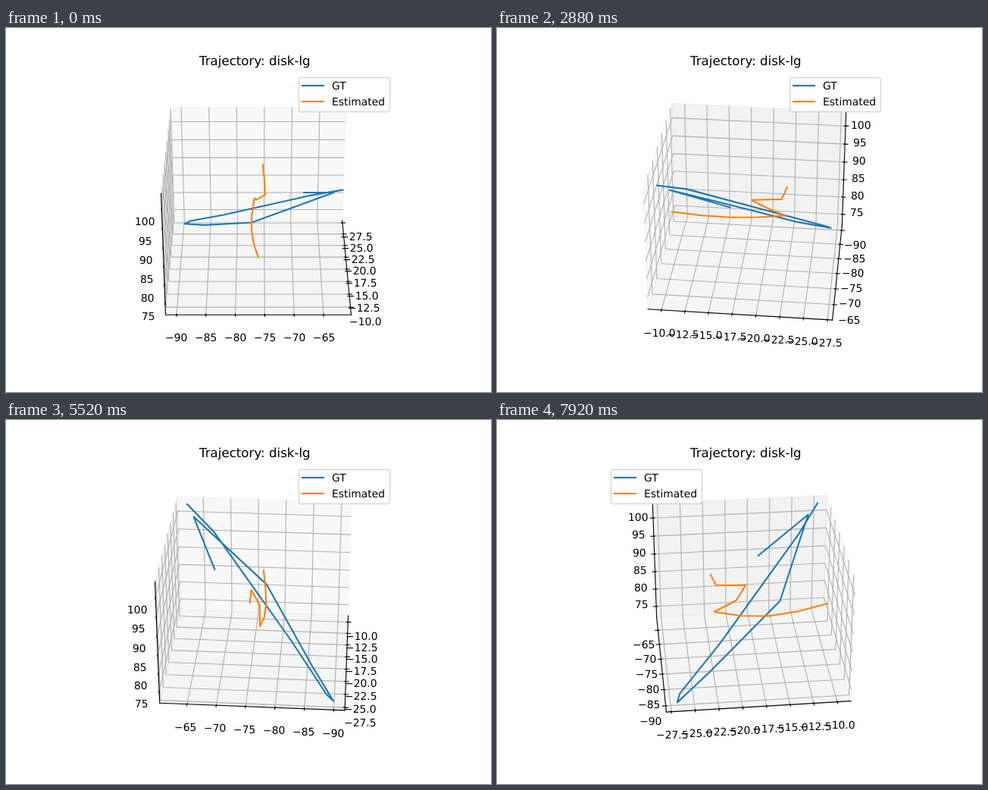
Recreate the animation shown at these times as an HTML page with a canvas. Size 640x480 px, loop 8 s.

```html
<!DOCTYPE html>
<html lang="en">
<head>
<meta charset="utf-8">
<title>Trajectory</title>
<style>
  html, body { margin: 0; width: 100%; height: 100%; overflow: hidden; background: #fff; }
  canvas { display: block; }
</style>
</head>
<body>
<canvas id="stage" width="640" height="480"></canvas>
<script>
const ctx = document.getElementById('stage').getContext('2d');

const LOOP = 8000, STEP = 120, DEGREES_PER_STEP = 4;
const PT = 100 / 72;              // pixels per point
const FONT = '"DejaVu Sans", Verdana, sans-serif';
const BLUE = '#1f77b4', ORANGE = '#ff7f0e';

// Camera: fixed elevation and distance, the azimuth turns.
const DISTANCE = 10, SCALE = 369.6 / 0.185, CENTER_X = 333, CENTER_Y = 237.4;
const SIN_E = 0.5, COS_E = Math.sqrt(3) / 2;

// Half sizes of the box, centred on the origin.
const HALF = [4, 4, 3].map(side => side * 0.1488);
const DELTA = HALF.map(h => h * 0.16);
const LABEL_SHIFT = 1.037;

const makeAxis = (dim, lo, hi, step, tone) => {
  const ticks = [];
  for (let value = Math.ceil(lo / step) * step; value < hi; value += step) {
    ticks.push({
      at: (2 * (value - lo) / (hi - lo) - 1) * HALF[dim],
      text: value.toFixed(step % 1 ? 1 : 0).replace('-', '\u2212')
    });
  }
  // "side" is the dimension in which the axis line moves to the front and its ticks point.
  return { ticks, side: dim === 0 ? 1 : 0, pane: `rgba(${tone},${tone},${tone},0.5)` };
};
const AXES = [
  makeAxis(0, -28.02, -8.56, 2.5, 242),
  makeAxis(1, -91.87, -60.3, 5, 230),
  makeAxis(2, 71.78, 103.92, 5, 236)
];

// The true path climbs with x, apart from a lift at some corners.
const corner = (x, y, lift = 0) => [x, y, 0.825 * x + lift];
const TRUTH = [
  corner(0.092, 0.296, 0.093), corner(0.45, 0.47), corner(0.199, -0.043, -0.158),
  corner(-0.296, -0.37, -0.062), corner(-0.52, -0.52), corner(-0.5, -0.474, 0.02),
  corner(-0.213, -0.231), corner(0.367, 0.324), corner(0.52, 0.52)
];

// The estimate sags along a shallow arc, then hooks back and up.
const arc = n => [
  0.52 - n * (0.205 - 0.004 * n),
  -0.046 * Math.sin(n * Math.PI / 5),
  -0.06 - 0.045 * Math.sin(n * Math.PI / 4)
];
const ESTIMATE = [
  ...Array.from({ length: 5 }, (_, n) => arc(n)),
  [-0.087, -0.015, 0.012], [-0.02, 0.045, 0.088], [-0.216, 0.04, 0.102], [-0.251, 0.03, 0.189]
];

let cosA, sinA;

function project([x, y, z]) {
  const toward = x * cosA + y * sinA;
  const k = SCALE / (DISTANCE - COS_E * toward - SIN_E * z);
  return [CENTER_X + k * (y * cosA - x * sinA), CENTER_Y - k * (COS_E * z - SIN_E * toward)];
}

function replaced(point, dim, value) {
  const copy = point.slice();
  copy[dim] = value;
  return copy;
}

function trace(points) {
  ctx.beginPath();
  points.forEach(p => ctx.lineTo(...p));
}

function stroke(points, color, widthPt, cap = 'square') {
  trace(points);
  ctx.strokeStyle = color;
  ctx.lineWidth = widthPt * PT;
  ctx.lineCap = cap;
  ctx.lineJoin = 'round';
  ctx.stroke();
}

function write(text, x, baseline, sizePt, centered) {
  ctx.font = `${sizePt * PT}px ${FONT}`;
  ctx.textRendering = 'geometricPrecision';
  ctx.fillStyle = '#000';
  const left = centered ? x - ctx.measureText(text).width / 2 : x;
  ctx.fillText(text, Math.round(left), Math.round(baseline));
}

function drawPane(i, back) {
  const [p, q] = [0, 1, 2].filter(d => d !== i);
  const corners = [[-1, -1], [1, -1], [1, 1], [-1, 1]].map(([a, b]) =>
    project(replaced(replaced(back, p, a * HALF[p]), q, b * HALF[q])));
  trace(corners);
  ctx.fillStyle = AXES[i].pane;
  ctx.fill();
  stroke(corners, AXES[i].pane, 1, 'butt');
}

function drawGrid(i, back) {
  const p = (i + 1) % 3, q = (i + 2) % 3;
  for (const tick of AXES[i].ticks) {
    const bend = replaced(back, i, tick.at);
    const line = [replaced(bend, p, -back[p]), bend, replaced(bend, q, -back[q])];
    stroke(line.map(project), '#b0b0b0', 0.8, 'butt');
  }
}

function drawAxis(i, back) {
  const { side, ticks } = AXES[i];
  const edge = replaced(back, side, -back[side]);
  stroke([edge, replaced(edge, i, -edge[i])].map(project), '#000', 0.8);
  const outward = Math.sign(edge[side]) * DELTA[side];
  for (const { at, text } of ticks) {
    const base = replaced(edge, i, at);
    const ends = [-0.1, 0.2].map(f => project(replaced(base, side, edge[side] + f * outward)));
    stroke(ends, '#000', 0.8);
    const anchor = base.map((c, d) => d === i ? c : c + Math.sign(c) * LABEL_SHIFT * DELTA[d]);
    const [x, y] = project(anchor);
    write(text, x, y + 11, 10, true);
  }
}

function drawLegend(left) {
  ctx.beginPath();
  ctx.roundRect(left + 0.5, 65.5, 120, 45, 2.8);
  ctx.fillStyle = 'rgba(255,255,255,0.8)';
  ctx.fill();
  ctx.strokeStyle = 'rgba(204,204,204,0.8)';
  ctx.lineWidth = PT;
  ctx.stroke();
  [['GT', BLUE], ['Estimated', ORANGE]].forEach(([name, color], n) => {
    const y = 76 + 21 * n;
    stroke([[left + 5, y], [left + 33, y]], color, 1.5);
    write(name, left + 44, y + 5, 10);
  });
}

function draw(time) {
  const azimuth = Math.floor(time % LOOP / STEP) * DEGREES_PER_STEP * Math.PI / 180;
  cosA = Math.cos(azimuth);
  sinA = Math.sin(azimuth);
  const back = [cosA >= 0 ? -HALF[0] : HALF[0], sinA >= 0 ? -HALF[1] : HALF[1], -HALF[2]];

  ctx.fillStyle = '#fff';
  ctx.fillRect(0, 0, 640, 480);
  for (const part of [drawPane, drawGrid, drawAxis]) {
    for (let i = 0; i < 3; i++) part(i, back);
  }
  stroke(TRUTH.map(project), BLUE, 1.5);
  stroke(ESTIMATE.map(project), ORANGE, 1.5);
  write('Trajectory: disk-lg', 328, 49, 12, true);

  // The legend moves to the left corner when the path reaches the right one.
  const [tipX, tipY] = project(TRUTH[TRUTH.length - 1]);
  drawLegend(tipX > 386 && tipY < 112 ? 150 : 386);
}

const start = performance.now();
function tick() {
  draw(performance.now() - start);
  requestAnimationFrame(tick);
}
tick();
</script>
</body>
</html>
```
